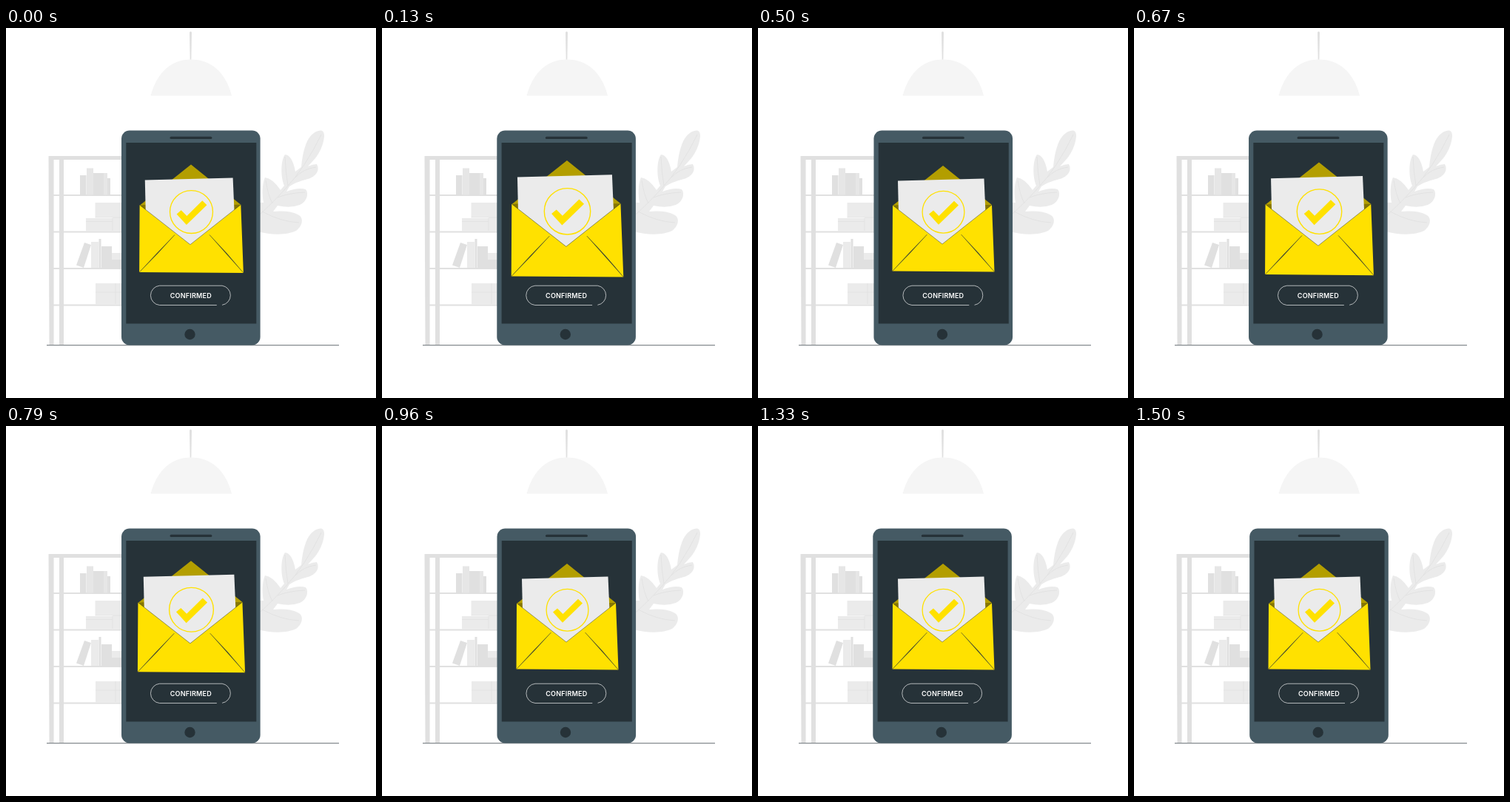
An HTML page for the animation above (1.54 s loop, 500 px wide and 500 px high).

```html
<!DOCTYPE html>
<html lang="en">
<head>
<meta charset="utf-8">
<title>Confirmed</title>
<style>
  html, body { margin: 0; width: 100%; height: 100%; overflow: hidden; background: #fff; }
  svg { display: block; width: 100%; height: 100%; }
</style>
</head>
<body>
<svg viewBox="0 0 500 500">
  <!-- lamp -->
  <path d="M248 6Q249.500 3 251 6L250.300 43H248.700Z" fill="#e0e0e0"/>
  <path d="M195.500 91.500C204 60 223 42.500 250 42.500S297 60 305 91.500Z" fill="#f5f5f5"/>

  <!-- bookcase -->
  <g fill="#e0e0e0">
    <path d="M57.500 173H175V178H78V428H72V178H64.500V428H58.500Z"/>
    <path d="M64 225h110v2H64zM64 274.500h110v2H64zM64 324h110v2H64zM64 373.500h110v2H64z"/>
    <path d="M100 199h8.500v26.500H100zM118 196h14v29.500h-14zM137 203h4v22.500h-4z"/>
    <path d="M106 290L115 293L105 324L95 320.500ZM125.500 285h3v39h-3zM129 295h14v29h-14zM143 313h25v11h-25z"/>
  </g>
  <g fill="#ebebeb">
    <path d="M109 189.500h9v36h-9zM132 196h5v29.500h-5z" fill="#e6e6e6"/>
    <path d="M120.500 236H170V256H120.500zM108 257h36v17.500h-36zM144 256h25v18.500h-25z"/>
    <path d="M115 289h10.500v35H115zM143 304h25v9h-25zM121 345h50v28.500h-50z"/>
    <path d="M120.500 256H170M108 261.500h36M144 257v17M121 357h50M148 345v28" stroke="#e0e0e0" stroke-width=".7"/>
  </g>

  <!-- plant -->
  <path fill="#ebebeb" d="M430 146C429 158 424 168 418 176L408 187Q414 184 420 184C425 193 418 201 408 204Q392 208 383 214L379 221Q395 215 405 218C410 224 406 235 397 239Q384 244 367 240L361 248Q384 246 396 253C403 258 400 268 392 274C380 280 359 280 340 275V236L348 236C346 225 346 211 350 202Q360 203 371 219L376 213C371 202 371 179 377 171Q387 172 391 194L399 188C400 177 402 164 407 153C412 143 420 138 426 138.500Q430 139 430 146Z"/>
  <path fill="none" stroke="#e0e0e0" stroke-width=".8" d="M426 144Q405 188 376 219T335 258M419 188Q402 190 391 202M404 222Q382 223 367 229M377 174Q378 196 381 213M351 206Q354 226 360 237M396 263Q372 262 346 248"/>

  <path d="M55 428.700H450" stroke="#263238" stroke-width=".7"/>

  <g id="phone">
    <rect x="156.200" y="138.500" width="187.600" height="290" rx="11" fill="#455a64"/>
    <rect x="162.500" y="155" width="176" height="244.500" fill="#263238"/>
    <path d="M223.300 148.400H277" stroke="#263238" stroke-width="3.200" stroke-linecap="round"/>
    <circle cx="248.700" cy="414" r="7.200" fill="#263238"/>
    <path d="M285 374.500H207.700A13.200 13.200 0 0 1 207.700 348.200H292.300A13.200 13.200 0 0 1 292.300 374.300" fill="none" stroke="#fff" stroke-width=".65"/>
    <text x="250" y="365" text-anchor="middle" font-family="Inter, sans-serif" font-size="9" font-weight="600" letter-spacing=".2" fill="#fff">CONFIRMED</text>
  </g>

  <g id="envelope">
    <path d="M182 240L250 186L316 239L249 292Z" fill="#b39e00"/>
    <path d="M182 240L190 239H307L316 239L249 292Z" fill="#867600"/>
    <path d="M189 206.500L305.500 203.500L307.500 250L249 294L190 250Z" fill="#ebebeb"/>
    <path d="M182 239.500L249 292L316 239L319.500 329.500L181.500 328.500Z" fill="#ffe100"/>
    <path d="M182 239.500L249 292L316 239" fill="none" stroke="#263238" stroke-width=".45"/>
    <path d="M228.500 279Q206 304.300 181.700 328.500Q204.800 303 228.500 279ZM274.500 279Q298 303 319.500 329.500Q296.700 304.200 274.500 279Z" fill="#263238" stroke="#263238" stroke-width=".3"/>
    <circle cx="250.500" cy="248.700" r="28.400" fill="none" stroke="#ffe100" stroke-width="1.300"/>
    <path d="M231 251.500L237 246.500L244.500 254L265 233.800L271 239.500L244 265.800Z" fill="#ffe100"/>
  </g>
</svg>
<script>
  const LOOP = 1540, CYCLE = 1500, FPS = 24, LEAD = 30;
  const phone = document.getElementById('phone');
  const envelope = document.getElementById('envelope');

  // [progress, value] keyframes, linear in between
  const shake = [0, -1, 2, -4, 4, -4, 4, -4, 2, -1, 0].map((x, i) => [i / 10, x]);
  const heartbeat = [[0, 1], [.1, 1.1], [.3, 1], [.4, 1], [.5, 1.1], [.6, 1], [1, 1]];

  function valueAt(keys, p) {
    const i = Math.max(1, keys.findIndex(([at]) => at >= p));
    const [a, from] = keys[i - 1], [b, to] = keys[i];
    return from + (to - from) * (p - a) / (b - a);
  }

  function draw(now) {
    const step = Math.floor((now % LOOP + 5) * FPS / 1000);
    const p = Math.min(1, (step * 1000 / FPS + LEAD) / CYCLE);
    phone.setAttribute('transform', `translate(${valueAt(shake, p)})`);
    envelope.setAttribute('transform',
      `translate(250.5 257.7) scale(${valueAt(heartbeat, p)}) translate(-250.5 -257.7)`);
  }

  const start = performance.now();
  function tick() {
    draw(performance.now() - start);
    requestAnimationFrame(tick);
  }
  tick();
</script>
</body>
</html>
```
